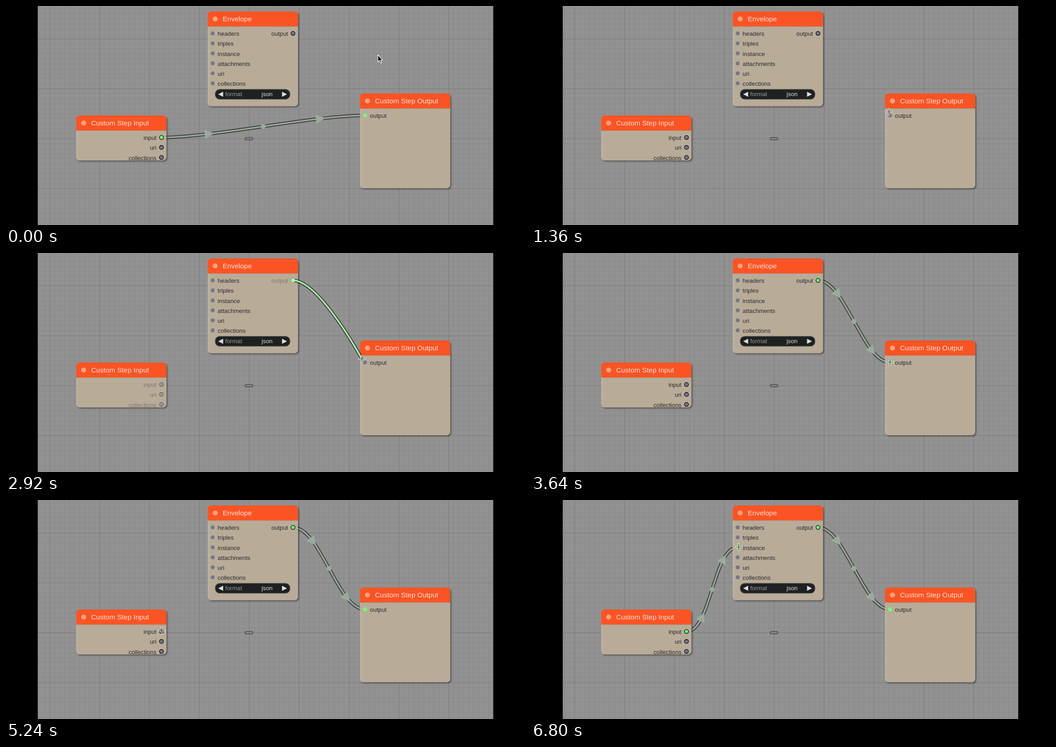
These frames come from a looping animation (1152x486 px, 8.08 s). An HTML page with a canvas:

```html
<!DOCTYPE html>
<html lang="en">
<head>
<meta charset="utf-8">
<title>Node graph</title>
<style>
html, body { margin: 0; width: 100%; height: 100%; overflow: hidden; background: #000; }
canvas { display: block; width: 100%; height: 100%; }
</style>
</head>
<body>
<canvas id="stage" width="1152" height="486"></canvas>
<script>
const ctx = document.getElementById('stage').getContext('2d');
const LOOP = 8080, TICK = 40, ZOOM = 1.1074;
const FONT = '"Liberation Sans", Arial, sans-serif';
const UNLINK = 1360, LINK_OUTPUT = 3640, LINK_INPUT = 6800;
const DRAG_OUTPUT = 2240, DRAG_INPUT = 5320;

// Slot positions on the stage
const inputPort = [345.1, 291.8], envelopeOut = [637.1, 60.8];
const envelopeInstance = [458.8, 105.1], outputPort = [796.8, 242.8];

// Pointer path: time, x, y
const pointerPath = [
  [0, 825, 108], [120, 825, 108], [280, 823, 120], [720, 803, 222], [920, 798, 240],
  [960, 798, 240], [1080, 798, 242.5], [1340, 798, 242.5], [1480, 775, 190],
  [1760, 670, 60], [1880, 642, 27], [2040, 637, 52], [2120, 637, 60], [2200, 637, 60],
  [2400, 694, 117], [2440, 699, 130], [2640, 745, 180], [2880, 790, 235], [2920, 790, 235],
  [3000, 796, 240], [3280, 797, 242], [4200, 797, 242], [4320, 660, 150], [4440, 492, 119],
  [4480, 470, 118], [4560, 440, 150], [4800, 385, 225], [5040, 357, 274], [5200, 346, 290],
  [5360, 345, 291], [5640, 375, 262], [5880, 419, 174], [5920, 419, 172.5],
  [6280, 455, 112], [6440, 461, 104.5], [LOOP, 461, 104.5]
];

function pointerAt(t) {
  const i = Math.max(1, pointerPath.findIndex(key => key[0] >= t));
  const [t0, x0, y0] = pointerPath[i - 1], [t1, x1, y1] = pointerPath[i];
  const p = (t - t0) / (t1 - t0);
  return [x0 + (x1 - x0) * p, y0 + (y1 - y0) * p];
}

function disc(x, y, r, color, outlined) {
  ctx.beginPath();
  ctx.arc(x, y, r, 0, Math.PI * 2);
  ctx.fillStyle = color;
  ctx.fill();
  if (outlined) strokePath('#000', 1.2);
}

function strokePath(color, width) {
  ctx.strokeStyle = color;
  ctx.lineWidth = width;
  ctx.stroke();
}

function polygon(points, color) {
  ctx.beginPath();
  points.forEach(([x, y]) => ctx.lineTo(x, y));
  ctx.closePath();
  ctx.fillStyle = color;
  ctx.fill();
}

function box(x, y, w, h, radius) {
  ctx.beginPath();
  ctx.roundRect(x, y, w, h, radius);
}

function text(label, x, y, color, size = 12, align = 'left') {
  ctx.font = `${size}px ${FONT}`;
  ctx.textAlign = align;
  ctx.fillStyle = color;
  ctx.fillText(label, x, y);
}

function drawGrid() {
  ctx.fillStyle = '#929292';
  ctx.fillRect(0, 0, 1152, 486);
  const step = 10 * ZOOM;
  for (let i = -9; i < 100; i++) {
    const major = i % 10 === 0, width = major ? 2 : 1.4;
    ctx.fillStyle = major ? 'rgba(40,50,60,.13)' : 'rgba(0,0,0,.04)';
    ctx.fillRect(97 + i * step - width / 2, 0, width, 486);
    ctx.fillRect(0, 73 + i * step - width / 2, 1152, width);
  }
  box(531, 291.8, 16.8, 5.4, 2.5);
  strokePath('#3a3a3a', 1.2);
}

// Cubic curve leaving `from` to the right; a free end has no tangent.
function wire(from, to, color, freeEnd) {
  const bend = Math.hypot(to[0] - from[0], to[1] - from[1]) / 4;
  const points = [from, [from[0] + bend, from[1]], [to[0] - (freeEnd ? 0 : bend), to[1]], to];
  ctx.beginPath();
  ctx.moveTo(...from);
  ctx.bezierCurveTo(...points[1], ...points[2], ...to);
  strokePath('rgba(0,0,0,.5)', 7 * ZOOM);
  strokePath(color, 3 * ZOOM);
  return points;
}

function curvePoint([a, b, c, d], t) {
  const u = 1 - t;
  return [0, 1].map(k =>
    u * u * u * a[k] + 3 * u * u * t * b[k] + 3 * u * t * t * c[k] + t * t * t * d[k]);
}

function drawLink(from, to) {
  const color = '#9aab9b', curve = wire(from, to, color);
  disc(...curvePoint(curve, .5), 5.5, color);
  for (const t of [.25, .75]) {
    const [x, y] = curvePoint(curve, t), [nx, ny] = curvePoint(curve, t + .01);
    ctx.save();
    ctx.translate(x, y);
    ctx.rotate(Math.atan2(ny - y, nx - x));
    polygon([[-6.5, -10.7], [14.5, 0], [-6.5, 10.7]], color);
    ctx.restore();
  }
}

function drawWidget(y) {
  box(15, y, 150, 20, 9);
  ctx.fillStyle = '#1e2122';
  ctx.fill();
  strokePath('#5d6058', 1);
  polygon([[31, y + 5], [21, y + 10], [31, y + 15]], '#ddd');
  polygon([[149, y + 5], [159, y + 10], [149, y + 15]], '#ddd');
  text('format', 35, y + 14, '#999');
  text('json', 130, y + 14, '#ddd', 12, 'right');
}

// Slots are [label, linked]; outputs fade while a wire is being dragged.
function drawNode({ x, y, height, title, inputs = [], outputs = [], widget }, dragging) {
  ctx.save();
  ctx.translate(x, y);
  ctx.scale(ZOOM, ZOOM);

  ctx.save();
  ctx.globalAlpha = .85;
  ctx.shadowColor = 'rgba(0,0,0,.5)';
  ctx.shadowOffsetX = ctx.shadowOffsetY = 2 * ZOOM;
  ctx.shadowBlur = 3 * ZOOM;
  box(0, -30, 181, height + 30, 7);
  ctx.fillStyle = 'rgb(202,189,166)';
  ctx.fill();
  ctx.restore();

  ctx.fillStyle = 'rgba(0,0,0,.12)';
  ctx.fillRect(0, 0, 181, 1);
  box(0, -30, 181, 30, [7, 7, 0, 0]);
  ctx.fillStyle = '#fa5425';
  ctx.fill();
  disc(15, -15, 5, '#fda27e');
  text(title, 30, -10, 'rgba(255,255,255,.82)', 14);

  const slotColor = linked => linked ? '#7f7' : '#778';
  inputs.forEach(([label, linked], i) => {
    const slotY = 14 + i * 20;
    disc(10, slotY, 4, slotColor(linked));
    text(label, 20, slotY + 5, '#2a2a2a');
  });
  ctx.globalAlpha = dragging ? .4 : 1;
  outputs.forEach(([label, linked], i) => {
    const slotY = 14 + i * 20;
    disc(171, slotY, 4, slotColor(linked), true);
    text(label, 161, slotY + 5, '#2a2a2a', 12, 'right');
  });
  ctx.globalAlpha = 1;
  if (widget) drawWidget(126);
  ctx.restore();
}

function drawPointer(x, y, arrow) {
  ctx.save();
  ctx.translate(x, y);
  if (arrow) {
    ctx.lineJoin = 'round';
    polygon([[0.5, 0.5], [0.5, 16], [4, 12.8], [6.4, 18.6], [8.8, 17.6], [6.4, 12], [10.8, 12]], '#000');
    strokePath('#fff', 1.2);
  } else {
    for (const [color, width, reach] of [['#fff', 3, 8], ['#111', 1.2, 7]]) {
      ctx.beginPath();
      ctx.moveTo(-reach, 0);
      ctx.lineTo(reach, 0);
      ctx.moveTo(0, -reach);
      ctx.lineTo(0, reach);
      strokePath(color, width);
    }
  }
  ctx.restore();
}

function draw(t) {
  const direct = t < UNLINK, outLinked = t >= LINK_OUTPUT, inLinked = t >= LINK_INPUT;
  const dragFrom = t >= DRAG_OUTPUT && !outLinked ? envelopeOut
    : t >= DRAG_INPUT && !inLinked ? inputPort : null;
  const pointer = pointerAt(t);

  drawGrid();
  if (direct) drawLink(inputPort, outputPort);
  if (outLinked) drawLink(envelopeOut, outputPort);
  if (inLinked) drawLink(inputPort, envelopeInstance);

  const nodes = [
    { x: 155.7, y: 276.3, height: 60, title: 'Custom Step Input',
      outputs: [['input', direct || inLinked], ['uri'], ['collections']] },
    { x: 785.7, y: 227.3, height: 160, title: 'Custom Step Output',
      inputs: [['output', direct || outLinked]] },
    { x: 447.7, y: 45.3, height: 160, title: 'Envelope', widget: true,
      inputs: [['headers'], ['triples'], ['instance', inLinked], ['attachments'], ['uri'], ['collections']],
      outputs: [['output', outLinked]] }
  ];
  nodes.forEach(node => drawNode(node, dragFrom));

  if (dragFrom) {
    wire(dragFrom, pointerAt(t - TICK), '#afa', true);
    disc(...dragFrom, 4.5, '#afa');
  }
  ctx.fillStyle = '#000';
  ctx.fillRect(0, 0, 70.5, 486);
  ctx.fillRect(1081.5, 0, 70.5, 486);
  drawPointer(...pointer, t < 920 && pointer[1] < 194);
}

const start = performance.now();
function frame() {
  const t = (performance.now() - start) % LOOP;
  draw(Math.floor(t / TICK) * TICK);
  requestAnimationFrame(frame);
}
frame();
</script>
</body>
</html>
```
